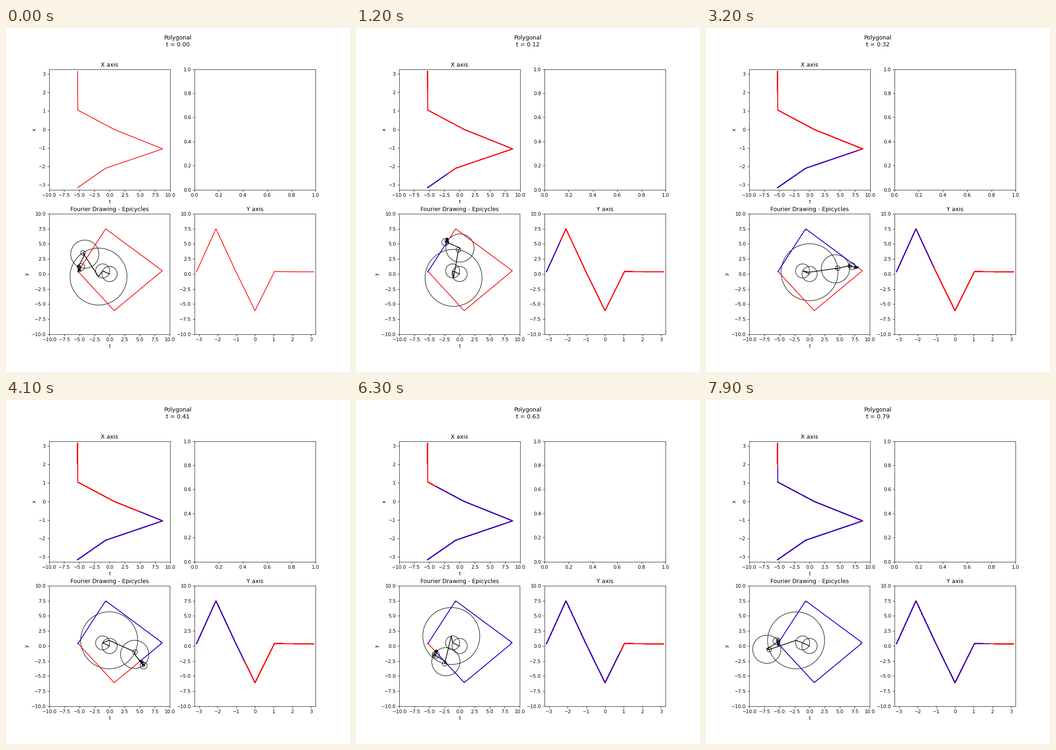
A matplotlib script that plays this animation: 748 px wide and 748 px high, repeating every 8000 ms.

```python
import numpy as np
import matplotlib.pyplot as plt
from matplotlib.animation import FuncAnimation
from matplotlib.collections import EllipseCollection

FRAMES = 80
ORDER = 50
DPI = 75
SIDE = 748 / DPI

# Corners of the path, equally spaced in parameter from -pi to pi.
corners = np.array([-5.285 + 0.35j, -0.66 + 7.5j, 8.76 + 0.53j,
                    0.77 - 6.1j, -5.25 + 0.415j, -5.275 + 0.35j])
knots = -np.pi + np.arange(7) * np.pi / 3
path = np.append(corners, corners[0])

# Fourier coefficients of the polygon, ordered 0, 1, -1, 2, -2, ...
bends = (np.roll(corners, -1) - 2 * corners + np.roll(corners, 1)) * 3 / np.pi
freqs = np.array([0] + [s * n for n in range(1, ORDER + 1) for s in (1, -1)])
coefs = np.array([corners.mean()] + [
    -(bends * np.exp(-1j * n * knots[:6])).sum() / (2 * np.pi * n * n)
    for n in freqs[1:]])

angles = -np.pi + 2 * np.pi * np.arange(FRAMES) / 100


def chain(k):
    """Joints of the epicycle arm at step k, starting at the origin."""
    arms = coefs * np.exp(1j * freqs * angles[k])
    return np.append(0, np.cumsum(arms))


trace = np.array([chain(k)[-1] for k in range(FRAMES)])

fig, ((ax_x, ax_empty), (ax_f, ax_y)) = plt.subplots(
    2, 2, figsize=(SIDE, SIDE), dpi=DPI)
heading = fig.suptitle("Polygonal\nt = 0.00")

ax_x.set(title="X axis", xlabel="t", ylabel="x",
         xlim=(-10, 10), ylim=(-3.25, 3.25))
ax_y.set(title="Y axis", xlim=(-3.25, 3.25), ylim=(-10, 10))
ax_f.set(title="Fourier Drawing - Epicycles", xlabel="t", ylabel="y",
         xlim=(-10, 10), ylim=(-10, 10), aspect="equal")

# The side plots gain one more red and blue stroke at every step.
layers = []
for k in range(FRAMES):
    done = slice(0, k + 1)
    layers.append(
        ax_x.plot(path.real, knots, "r")
        + ax_x.plot(trace.real[done], angles[done], "b")
        + ax_y.plot(knots, path.imag, "r")
        + ax_y.plot(angles[done], trace.imag[done], "b"))

ax_f.plot(path.real, path.imag, "r")
drawn, = ax_f.plot([], [], "b")
arm, = ax_f.plot([], [], "k")
size = 2 * np.abs(coefs)
circles = EllipseCollection(
    size, size, np.zeros(len(size)), units="xy",
    offsets=np.zeros((len(size), 2)), offset_transform=ax_f.transData,
    facecolors="none", edgecolors="black", linewidths=1, zorder=1)
ax_f.add_collection(circles, autolim=False)


def update(k):
    heading.set_text(f"Polygonal\nt = {k / 100:.2f}")
    for i, lines in enumerate(layers):
        for line in lines:
            line.set_visible(i <= k)
    joints = chain(k)
    arm.set_data(joints.real, joints.imag)
    circles.set_offsets(np.column_stack([joints.real, joints.imag])[:-1])
    drawn.set_data(trace.real[:k + 1], trace.imag[:k + 1])
    return []


anim = FuncAnimation(fig, update, frames=FRAMES, interval=100,
                     repeat=True, repeat_delay=0, blit=False)
plt.show()
```
